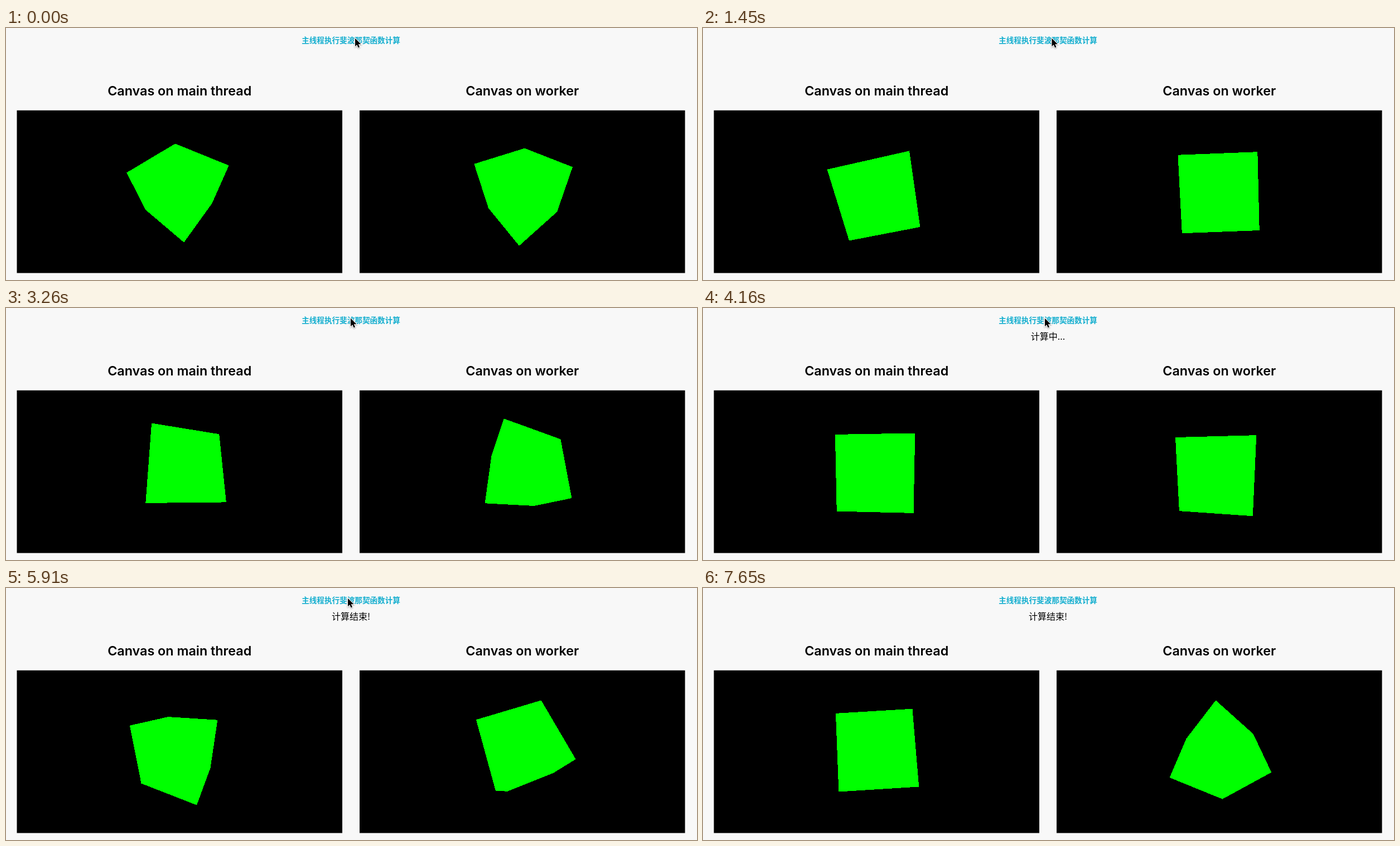
Write an HTML page that moves like this. It is 1239 px wide and 452 px high and loops after 7.75 s.

```html
<!DOCTYPE html>
<html lang="zh">
<head>
<meta charset="utf-8">
<title>Canvas threads</title>
<style>
  html, body { margin: 0; width: 100%; height: 100%; overflow: hidden; background: #f8f8f8; }
  svg { display: block; }
  text { text-anchor: middle; font-family: "Noto Sans CJK SC", "Noto Sans CJK", sans-serif; }
  .title { font: 600 23.3px Inter, sans-serif; }
  .link { font-size: 13.6px; font-weight: 700; fill: #14aecf; }
  .status { font-size: 16px; }
  .cube { fill: #0f0; shape-rendering: crispEdges; }
</style>
</head>
<body>
<svg width="1239" height="452" viewBox="0 0 1239 452">
  <text class="link" x="618.5" y="27.2">主线程执行斐波那契函数计算</text>
  <text class="status" id="status" x="618.5" y="56.5"></text>
  <text class="title" x="311.2" y="121">Canvas on main thread</text>
  <text class="title" x="925.8" y="121">Canvas on worker</text>
  <rect x="19.5" y="147.75" width="583.5" height="291.75"/>
  <rect x="634" y="147.75" width="583.5" height="291.75"/>
  <path class="cube" id="main"/>
  <path class="cube" id="worker"/>
  <path id="cursor" d="M0 0V14.6L3.3 11.4L5.6 16.7L8 15.7L5.8 10.6H10.4Z"
    stroke="#fff" stroke-width="2" paint-order="stroke"
    style="filter: drop-shadow(0 1px 1px rgba(0,0,0,.35))"/>
</svg>
<script>
const LOOP = 7750, SPEED = .000614;              // radians per ms
const BLOCK_START = 3750, BLOCK_END = 5280;      // main thread is busy
const FOCAL = 189.6, DIST = 3.69, CY = 293.6;
const el = id => document.getElementById(id);
const ramp = (t, from, to) => Math.min(1, Math.max(0, (t - from) / (to - from)));

// Turn about y, then about x, then project
function project([x, y, z], angle, cx) {
  const c = Math.cos(angle), s = Math.sin(angle);
  const depth = z * c - x * s;
  const scale = FOCAL / (DIST - y * s - depth * c);
  return [cx + (x * c + z * s) * scale, CY - (y * c - depth * s) * scale];
}

function cubePath(angle, cx) {
  let d = '';
  for (let axis = 0; axis < 3; axis++) for (const side of [-1, 1]) {
    const pts = [[1, 1], [1, -1], [-1, -1], [-1, 1]].map(([u, v]) => {
      const p = [];
      p[axis] = side;
      p[(axis + 1) % 3] = u;
      p[(axis + 2) % 3] = v;
      return project(p, angle, cx);
    });
    const area = pts.reduce((sum, [x, y], i) => {
      const [nx, ny] = pts[(i + 1) % 4];
      return sum + x * ny - nx * y;
    }, 0);
    if (area < 0) pts.reverse();   // same winding, so faces unite
    d += 'M' + pts.map(p => p.map(n => n.toFixed(2))).join('L') + 'Z';
  }
  return d;
}

function draw() {
  const t = performance.now() % LOOP;
  const stall = (BLOCK_END - BLOCK_START) * ramp(t, BLOCK_START, BLOCK_END);
  el('main').setAttribute('d', cubePath(.893 + SPEED * (t - stall), 311));
  el('worker').setAttribute('d', cubePath(.718 + SPEED * t, 925.6));

  // Two small drifts to the left, then off through the bottom
  const exit = ramp(t, 6500, 6800);
  const x = 626 - 8 * ramp(t, 1400, 2200) - 5 * ramp(t, 3440, 3640) + 477 * exit;
  el('cursor').setAttribute('transform', `translate(${x} ${18.5 + 450 * exit * exit})`);

  el('status').textContent = t < BLOCK_START - 80 ? '' : t < BLOCK_END ? '计算中...' : '计算结束!';
  requestAnimationFrame(draw);
}
draw();
</script>
</body>
</html>
```
